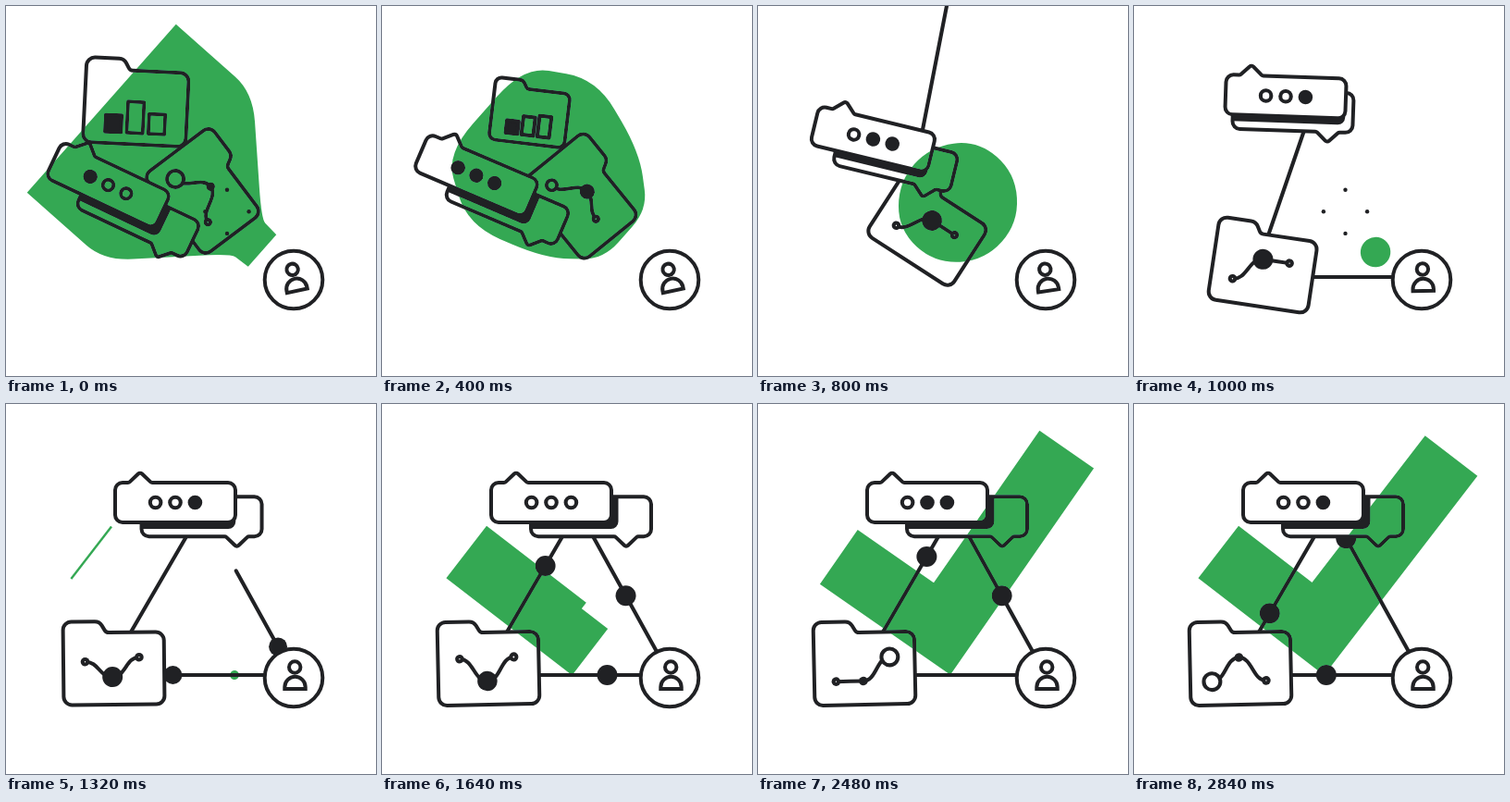
Recreate the animation shown at these times as an HTML page with a canvas. Size 400x400 px, loop 2.88 s.

```html
<!DOCTYPE html>
<html lang="en">
<head>
<meta charset="utf-8">
<title>Connected work</title>
<style>
  html, body { margin: 0; height: 100%; overflow: hidden; background: #fff; }
  canvas { display: block; width: 100vw; height: 100vh; }
</style>
</head>
<body>
<canvas id="stage" width="400" height="400"></canvas>
<script>
const ctx = document.getElementById('stage').getContext('2d');
const LOOP = 2880, STEP = 40, INK = '#202124', GREEN = '#34a853', PAPER = '#fff';
const TRIANGLE = [[311, 293], [212, 114], [108, 293]]; // person, bubbles, folder
const rad = deg => deg * Math.PI / 180;
const mix = (a, b, k) => a + (b - a) * k;
const mixAll = (a, b, k) => a.map((v, i) => mix(v, b[i], k));
const ramp = (t, from, to) => Math.min(1, Math.max(0, (t - from) / (to - from)));
const ease = (t, from, to) => (1 - Math.cos(Math.PI * ramp(t, from, to))) / 2;

// Carries a pose through eased moves, each given as from, to, next pose.
const glide = (t, pose, ...moves) =>
  moves.reduce((now, [from, to, next]) => mixAll(now, next, ease(t, from, to)), pose);

function rounded(corners, radius) {
  const path = new Path2D(), n = corners.length;
  path.moveTo(...mixAll(corners[n - 1].slice(0, 2), corners[0], 0.5));
  corners.forEach(([x, y, r = radius], i) => path.arcTo(x, y, ...corners[(i + 1) % n].slice(0, 2), r));
  path.closePath();
  return path;
}
const bubbleShape = rounded([
  [-65, -21.5], [-50, -21.5, 3], [-38, -33, 3], [-26, -21.5, 3],
  [65, -21.5], [65, 21.5], [-65, 21.5]], 8);
const shadowShape = rounded([[-65, -21.5], [65, -21.5], [65, 21.5], [-65, 21.5]], 8);
const folderShape = rounded([
  [-54.5, -45], [-15, -45], [-8, -33, 5], [54.5, -33], [54.5, 45], [-54.5, 45]], 9);

function at(x, y, angle, draw, scale = 1) {
  ctx.save();
  ctx.translate(x, y);
  ctx.rotate(rad(angle));
  ctx.scale(scale, scale);
  draw();
  ctx.restore();
}
function outline(path, fill = PAPER, width = 4) {
  ctx.fillStyle = fill;
  ctx.fill(path);
  ctx.lineWidth = width;
  ctx.stroke(path);
}
function disc(x, y, r, color = INK) {
  ctx.fillStyle = color;
  ctx.beginPath();
  ctx.arc(x, y, Math.max(0, r), 0, 7);
  ctx.fill();
}
function ring(x, y, r) {
  disc(x, y, r);
  disc(x, y, r - 4.1, PAPER);
}
function line(x1, y1, x2, y2) {
  ctx.lineWidth = 4.1;
  ctx.beginPath();
  ctx.moveTo(x1, y1);
  ctx.lineTo(x2, y2);
  ctx.stroke();
}
function tint(draw) { // colours paper but leaves ink as it is
  ctx.save();
  ctx.globalCompositeOperation = 'darken';
  draw();
  ctx.restore();
}

function pointOnTriangle(distance) {
  for (let i = 0; ; i = (i + 1) % 3) {
    const a = TRIANGLE[i], b = TRIANGLE[(i + 1) % 3];
    const side = Math.hypot(b[0] - a[0], b[1] - a[1]);
    if (distance <= side) return mixAll(a, b, distance / side);
    distance -= side;
  }
}

function links(t) {
  const [person, top, folder] = TRIANGLE;
  line(...glide(t, [222, -4, 222, -140],
    [600, 1000, [130, 292, 191, 114]], [1000, 1320, [...folder, ...top]]));
  const across = ease(t, 780, 980), up = ramp(t, 1150, 1420);
  if (across) line(...person, ...mixAll(person, folder, across));
  if (up) line(...person, ...mixAll(person, top, up));
  if (t < 1160) return;
  const size = mix(9, 11, ramp(t, 1160, 1500));
  for (const start of [35, 212, 484]) disc(...pointOnTriangle(start + (t - 1320) * 0.197), size);
}

// Three node heights and radii: raised nodes are marked 1, one node is big.
const graphPose = (raised, big) => [
  ...[...raised].map(mark => mark === '1' ? -6 : 19.5),
  ...[0, 1, 2].map(i => i === big ? 11 : 4.8)];

function graphFolder(t) {
  const pose = glide(t, [217.3, 200, 53], [0, 640, [218.5, 208, 50]],
    [640, 1000, [140, 280, 8.5]], [1000, 1380, [115, 280, -1.2]]);
  at(...pose, () => {
    outline(folderShape);
    const xs = [-31, -1.5, 27.5];
    const [a, b, c, ra, rb, rc] = glide(t, graphPose('010', 0),
      [0, 750, graphPose('011', 1)], [1000, 1440, graphPose('101', 1)],
      [1560, 2160, graphPose('001', 2)], [2480, 2840, graphPose('010', 0)]);
    ctx.beginPath();
    ctx.moveTo(xs[0], a);
    ctx.bezierCurveTo(-16, a, -16, b, xs[1], b);
    ctx.bezierCurveTo(13, b, 13, c, xs[2], c);
    ctx.stroke();
    ring(xs[0], a, ra);
    disc(xs[1], b, rb);
    ring(xs[2], c, rc);
  });
}

function barFolder(t) {
  const k = ramp(t, 0, 780) ** 2, scale = 1.02 * (1 - k);
  if (scale < 0.02) return;
  at(mix(140.7, 214, k), mix(103.7, 147, k), mix(2.8, 18, k), () => {
    outline(folderShape, PAPER, 4 / scale);
    [18, mix(33, 9, k), mix(21, 55, k)].forEach((h, i) => {
      const bar = new Path2D();
      bar.rect(-31.5 + i * 23, 33 - h, 17, h);
      outline(bar, i ? PAPER : INK, mix(3.8, 11, k));
    });
  }, scale);
}

function bubbles(t) {
  const pose = glide(t, [110.5, 193.6, 25.3], [0, 700, [96.5, 176.5, 21.7]],
    [640, 1000, [164, 97.8, 2]], [1000, 1320, [183, 106.5, 0]]);
  const [offset] = glide(t, [43], [640, 1000, [8.5]], [1000, 1580, [43]]);
  at(...pose, () => {
    const back = new Path2D();
    back.addPath(bubbleShape, new DOMMatrix().translate(offset, 15.3).rotate(180));
    outline(back);
    ctx.save();
    ctx.clip(back);
    ctx.translate(Math.max(0, offset - 28) / 2, 7);
    ctx.fillStyle = INK;
    ctx.fill(shadowShape);
    ctx.restore();

    outline(bubbleShape);
    const beat = t % 1840;
    for (let i = 0; i < 3; i++) {
      const filled = beat >= i * 100 && beat < (i + 1) * 450;
      (filled ? disc : ring)((i - 1) * 21.4, 0, 7.8);
    }
  });
}

function check(t) {
  const drawn = ease(t, 1280, 2060) * 372;
  if (!drawn) return;
  const [angle] = glide(t, [52.4], [1730, 2220, [42.8]], [2220, 2480, [55.2]], [2480, 2790, [52.4]]);
  tint(() => at(199, 243, -angle, () => {
    ctx.strokeStyle = GREEN;
    ctx.lineWidth = 71.5;
    ctx.lineCap = 'butt';
    ctx.lineJoin = 'miter';
    ctx.setLineDash([drawn, 999]);
    ctx.beginPath();
    ctx.moveTo(0, -136);
    ctx.lineTo(0, 0);
    ctx.lineTo(236, 0);
    ctx.stroke();
  }));
}

// A symmetric funnel aimed at the person rounds off to a ball, then shrinks onto the link.
function blob(t) {
  const k = ease(t, 0, 640), axis = rad(41.5), cos = Math.cos(axis), sin = Math.sin(axis);
  const [cx, cy, r] = glide(t, [182, 173, 100], [640, 1000, [261, 266, 16.3]],
    [1000, 1320, [247, 293, 5]], [1320, 1440, [240, 293, 0]]);
  if (r <= 0) return;
  const half = [[232, 121.5, 0], [121, 121.5, 0.46], [23, 24.8, 0.5], [0, 23, 0]]; // reach, width, softness
  const outlinePoints = [...half, ...half.map(([reach, width, soft]) => [reach, -width, soft]).reverse()];
  const points = outlinePoints.map(([reach, width, soft], i) => {
    const turn = rad(-157.5 + i * 45);
    const flat = 1 - 0.12 * r / 100 * Math.max(0, -Math.cos(turn)) ** 2;
    const radius = r * 1.082 * flat;
    const funnel = [277 - reach * cos + width * sin, 264.5 - reach * sin - width * cos, soft];
    const ball = [cx + radius * Math.cos(turn + axis), cy + radius * Math.sin(turn + axis), 1];
    return mixAll(funnel, ball, k);
  });
  const toward = (p, q) => [mix(p[0], q[0], p[2] / 2), mix(p[1], q[1], p[2] / 2)];
  tint(() => {
    ctx.fillStyle = GREEN;
    ctx.beginPath();
    points.forEach((p, i) => {
      ctx.lineTo(...toward(p, points[(i + 7) % 8]));
      ctx.quadraticCurveTo(p[0], p[1], ...toward(p, points[(i + 1) % 8]));
    });
    ctx.fill();
  });
}

function person(t) {
  const badge = new Path2D();
  badge.arc(311, 296, 31.3, 0, 7);
  outline(badge);
  at(312.5, 297, -12 * (1 - ease(t, 640, 1100)), () => {
    const head = new Path2D(), body = new Path2D();
    head.arc(-0.3, -12.5, 6.2, 0, 7);
    body.moveTo(-11.2, 11);
    body.arc(0, 9, 11.2, Math.PI, 0);
    body.lineTo(11.2, 11);
    body.closePath();
    ctx.lineJoin = 'miter';
    outline(head);
    outline(body);
  });
}

function sparks(t) {
  const opening = t < 120;
  if (!opening && (t < 940 || t >= 1080)) return;
  for (let i = 0; i < 4; i++) {
    const a = rad(i * 90);
    disc((opening ? 239 : 228.5) + 23.6 * Math.cos(a), 222.3 + 23.6 * Math.sin(a), 2.2);
  }
}

function draw(t) {
  ctx.fillStyle = PAPER;
  ctx.fillRect(0, 0, 400, 400);
  ctx.strokeStyle = INK;
  ctx.lineCap = ctx.lineJoin = 'round';
  for (const part of [links, barFolder, graphFolder, bubbles, check, blob, sparks, person]) part(t);
}

function tick() {
  draw(Math.floor(performance.now() % LOOP / STEP) * STEP);
  requestAnimationFrame(tick);
}
tick();
</script>
</body>
</html>
```
